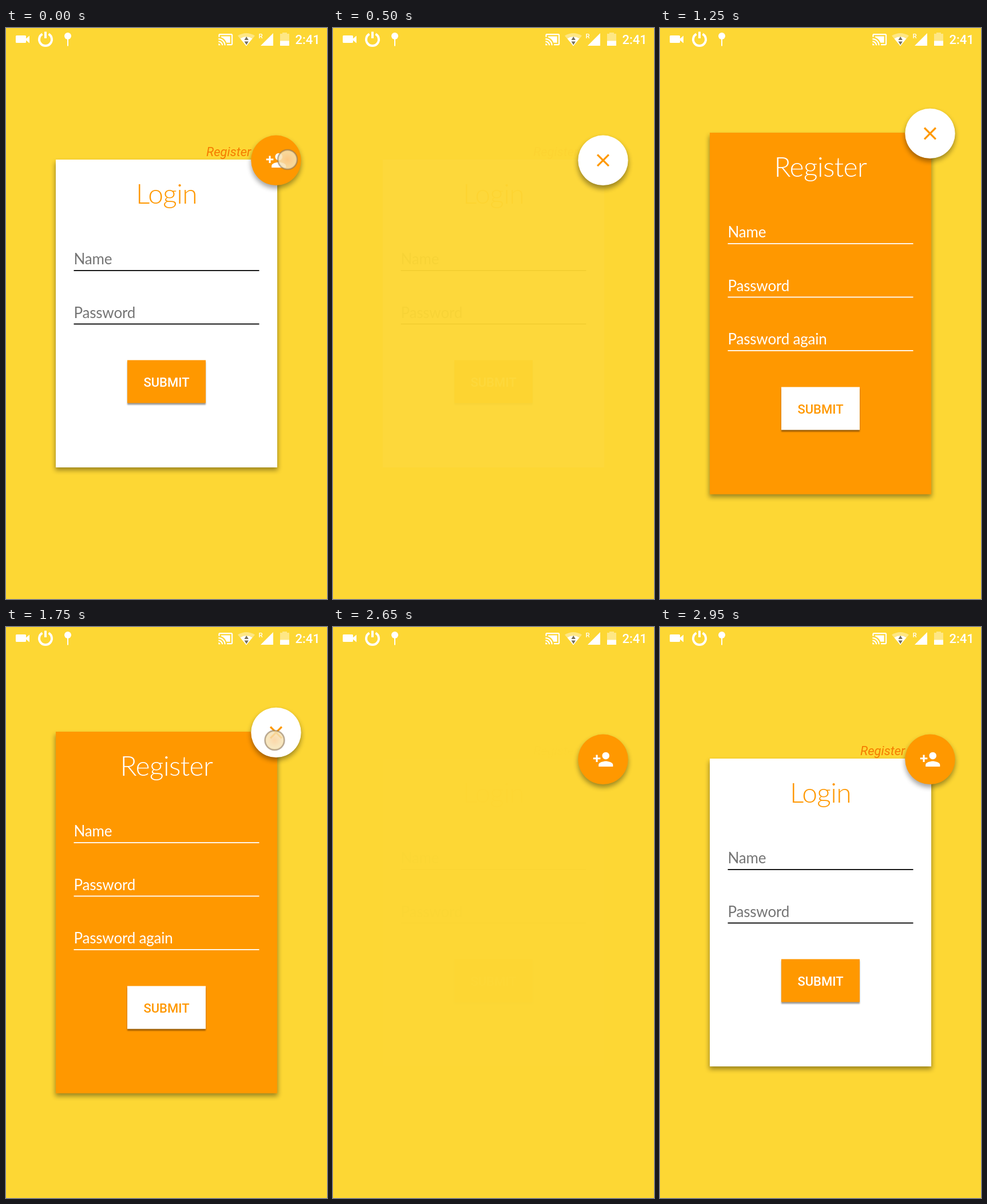
Animation of 561 by 998 pixels, one loop 3250 ms. Source, as an HTML page:

```html
<!DOCTYPE html>
<html lang="en">
<head>
<meta charset="utf-8">
<title>Login and register</title>
<style>
  html, body { margin: 0; width: 100%; height: 100%; overflow: hidden; background: #fdd734; }
  svg { display: block; width: 100vw; height: 100vh; }
  text { font-family: Roboto, sans-serif; }
  .title, .hint { font-family: Lato, sans-serif; }
  .title { font-size: 48px; font-weight: 300; text-anchor: middle; letter-spacing: -.6px; }
  .hint { font-size: 26px; letter-spacing: -.2px; }
  .button { font-size: 22px; font-weight: 500; text-anchor: middle; }
</style>
</head>
<body>
<svg viewBox="0 0 561 998">
  <defs>
    <filter id="soft" x="-30%" y="-30%" width="160%" height="160%"><feGaussianBlur stdDeviation="4"/></filter>
    <filter id="thin" x="-10%" y="-20%" width="120%" height="140%"><feGaussianBlur stdDeviation="1"/></filter>
    <clipPath id="clip"><rect id="clipBox"/></clipPath>
    <radialGradient id="dot">
      <stop offset="0" stop-color="#fbd09a" stop-opacity=".85"/>
      <stop offset=".8" stop-color="#f6e3b6" stop-opacity=".85"/>
      <stop offset="1" stop-color="#e5cfa0" stop-opacity=".85"/>
    </radialGradient>
  </defs>
  <rect width="561" height="998" fill="#fdd734"/>

  <g fill="#fff">
    <path d="M18.500 13h15q1.500 0 1.500 1.500v4l6-5v13l-6-5v3q0 1.500-1.500 1.500h-15q-1.500 0-1.500-1.500v-10q0-1.500 1.500-1.500z"/>
    <path d="M63.500 10.500a11 11 0 1 0 11 0M69 6.500v11.500" fill="none" stroke="#fff" stroke-width="4"/>
    <circle cx="108" cy="14" r="6"/>
    <rect x="107" y="19" width="2" height="12.500"/>
    <path transform="translate(370.200 6.600) scale(1.130)" d="M1 18v3h3c0-1.660-1.340-3-3-3zm0-4v2c2.760 0 5 2.240 5 5h2c0-3.870-3.130-7-7-7zm18-7H5v1.630c3.960 1.280 7.090 4.410 8.370 8.370H19V7zM1 10v2c4.970 0 9 4.030 9 9h2c0-6.080-4.930-11-11-11zm20-7H3c-1.100 0-2 .9-2 2v3h2V5h18v14h-7v2h7c1.100 0 2-.9 2-2V5c0-1.100-.9-2-2-2z"/>
    <path d="M405 13.500q15-9 30 0L420 31.500z" opacity=".4"/>
    <path d="M409.500 18.500q10.500-6.500 21 0L420 31.500z"/>
    <path d="M416.500 21l3.700-6 3.700 6zM416.500 23.500h7.400l-3.700 6z" fill="#77705a"/>
    <path d="M445 31L467 9v22z"/>
    <text x="441.500" y="18" font-size="11.500" font-weight="500">R</text>
    <path d="M483 8h8v2h4v13h-16V10h4z" opacity=".4"/>
    <path d="M479 22.500h16V31h-16z"/>
    <text x="505.500" y="28" font-size="22" font-weight="500">2:41</text>
  </g>

  <g id="login"></g>
  <g id="register"></g>

  <g id="fab">
    <circle id="fabShade" cx="472" filter="url(#soft)"/>
    <circle id="fabDisc" cx="472" r="43.700"/>
    <path id="person" transform="translate(453.200 -18.800) scale(1.570)" fill="#fff" d="M15 12c2.210 0 4-1.790 4-4s-1.790-4-4-4-4 1.790-4 4 1.790 4 4 4zm-9-2V7H4v3H1v2h3v3h2v-3h3v-2H6zm9 4c-2.670 0-8 1.340-8 4v2h16v-2c0-2.660-5.330-4-8-4z"/>
    <g id="cross" fill="none" stroke="#ff9800" stroke-width="3.200">
      <path id="slashDown" d="M462.100-9.900l19.800 19.800" pathLength="1" stroke-dasharray="1 2"/>
      <path id="slashTop" d="M481.900-9.900L472 0" pathLength="1" stroke-dasharray="1 2"/>
      <path id="slashEnd" d="M472 0l-9.900 9.900"/>
    </g>
  </g>
  <g id="touch">
    <circle r="17" fill="url(#dot)" stroke="#8a7458" stroke-opacity=".55" stroke-width="2.500"/>
  </g>
</svg>
<script>
const LOOP = 3250, STEP = 50;
const ORANGE = '#ff9800';
const FULL = { x: 87, y: 183, w: 387, h: 632 };
const SEED = { x: 475, y: 226 };
const $ = id => document.getElementById(id);

const set = (el, attrs) => { for (const k in attrs) el.setAttribute(k, attrs[k]); };
const show = (el, on) => el.setAttribute('visibility', on ? 'visible' : 'hidden');
const lerp = (a, b, p) => a + (b - a) * p;
const ramp = (t, from, to) => Math.min(1, Math.max(0, (t - from) / (to - from)));
const ease = (t, from, to) => (1 - Math.cos(Math.PI * ramp(t, from, to))) / 2;

const shadow = '<rect class="shade" x="-1" y="5" opacity=".38" filter="url(#soft)"/>';

const field = (label, i, ink, line) => `
  <text class="hint" x="31.500" y="${183 + i * 93.5}" fill="${ink}">${label}</text>
  <rect x="31.500" y="${193 + i * 93.5}" width="324" height="1.800" fill="${line}"/>`;

const button = (fill, ink) => `
  <rect x="125" y="3" width="137" height="75" opacity=".4" filter="url(#thin)"/>
  <rect x="125" width="137" height="75" fill="${fill}"/>
  <text class="button" x="193.500" y="46" fill="${ink}">SUBMIT</text>`;

const title = (label, ink) => `<text class="title" x="193.500" y="77" fill="${ink}">${label}</text>`;

$('login').innerHTML = `
  <g transform="translate(87 230)">
    ${shadow}
    <rect width="387" height="538" fill="#fff"/>
    ${title('Login', ORANGE)}
    ${field('Name', 0, '#757575', '#000')}
    ${field('Password', 1, '#757575', '#000')}
    <g transform="translate(0 350.500)">${button(ORANGE, '#fff')}</g>
  </g>
  <text x="350" y="223.500" font-size="22" font-style="italic" fill="#f57c00">Register</text>`;

$('register').innerHTML = `
  ${shadow}
  <rect id="panel" fill="${ORANGE}"/>
  <g clip-path="url(#clip)">
    <g id="form">
      ${title('Register', '#fff')}
      ${field('Name', 0, '#fff', '#fff')}
      ${field('Password', 1, '#fff', '#fff')}
      <g id="send">${button('#fff', ORANGE)}</g>
    </g>
    <g id="again">${field('Password again', 2, '#fff', '#fff')}</g>
  </g>`;

const loginShade = $('login').querySelector('.shade');
const panelShade = $('register').querySelector('.shade');
set(loginShade, { width: 389, height: 538 });

function drawLogin(t) {
  const alpha = t < 1500 ? 1 - ease(t, 237, 537) : ease(t, 2640, 2940);
  $('login').setAttribute('opacity', alpha);
  show($('login'), alpha > 0);
  show(loginShade, t < 237 || t >= 2940);
}

function drawRegister(t, grow) {
  const closing = t >= 2035;
  const w = FULL.w * grow, h = FULL.h * grow;
  show($('register'), grow > 0);
  set($('register'), { transform: `translate(${lerp(SEED.x, FULL.x, grow)} ${lerp(SEED.y, FULL.y, grow)})` });
  set($('panel'), { width: w, height: h });
  set($('clipBox'), { width: Math.max(0, w - 25), height: Math.max(0, h - 24) });
  set(panelShade, { width: w + 2, height: h, display: closing ? 'none' : 'inline' });
  set($('form'), { display: closing ? 'none' : 'inline' });
  set($('send'), { transform: `translate(0 ${lerp(351, 444.5, grow)})` });
  set($('again'), { opacity: ease(t, 870, 1210) * (1 - ease(t, 2035, 2335)) });
}

function drawFab(t, grow) {
  const open = t >= 237 && t < 2035;
  const lift = ramp(t, 50, 200) * (1 - ramp(t, 400, 550));
  set($('fab'), { transform: `translate(0 ${lerp(231.3, 184.4, grow)})` });
  set($('fabShade'), { cy: 5 + 2 * lift, r: 44 + 2 * lift, opacity: .36 });
  set($('fabDisc'), { fill: open ? '#fff' : ORANGE });
  set($('person'), { display: open ? 'none' : 'inline' });
  set($('cross'), { display: open ? 'inline' : 'none' });
  set($('slashDown'), { 'stroke-dashoffset': 1 - ramp(t, 220, 300) });
  set($('slashTop'), { 'stroke-dashoffset': 1 - ramp(t, 270, 350) });
  set($('slashEnd'), { opacity: ramp(t, 325, 400) });
}

function drawTouch(t) {
  const first = t < 100, second = t >= 1750 && t < 1950;
  show($('touch'), first || second);
  set($('touch'), { transform: first ? 'translate(492 230)' : 'translate(469.5 198)' });
}

function draw(t) {
  const grow = ease(t, 558, 858) * (1 - ease(t, 2335, 2635));
  drawLogin(t);
  drawRegister(t, grow);
  drawFab(t, grow);
  drawTouch(t);
}

const start = performance.now();
function tick() {
  const t = (performance.now() - start) % LOOP;
  draw(Math.floor(t / STEP) * STEP);
  requestAnimationFrame(tick);
}
tick();
</script>
</body>
</html>
```
